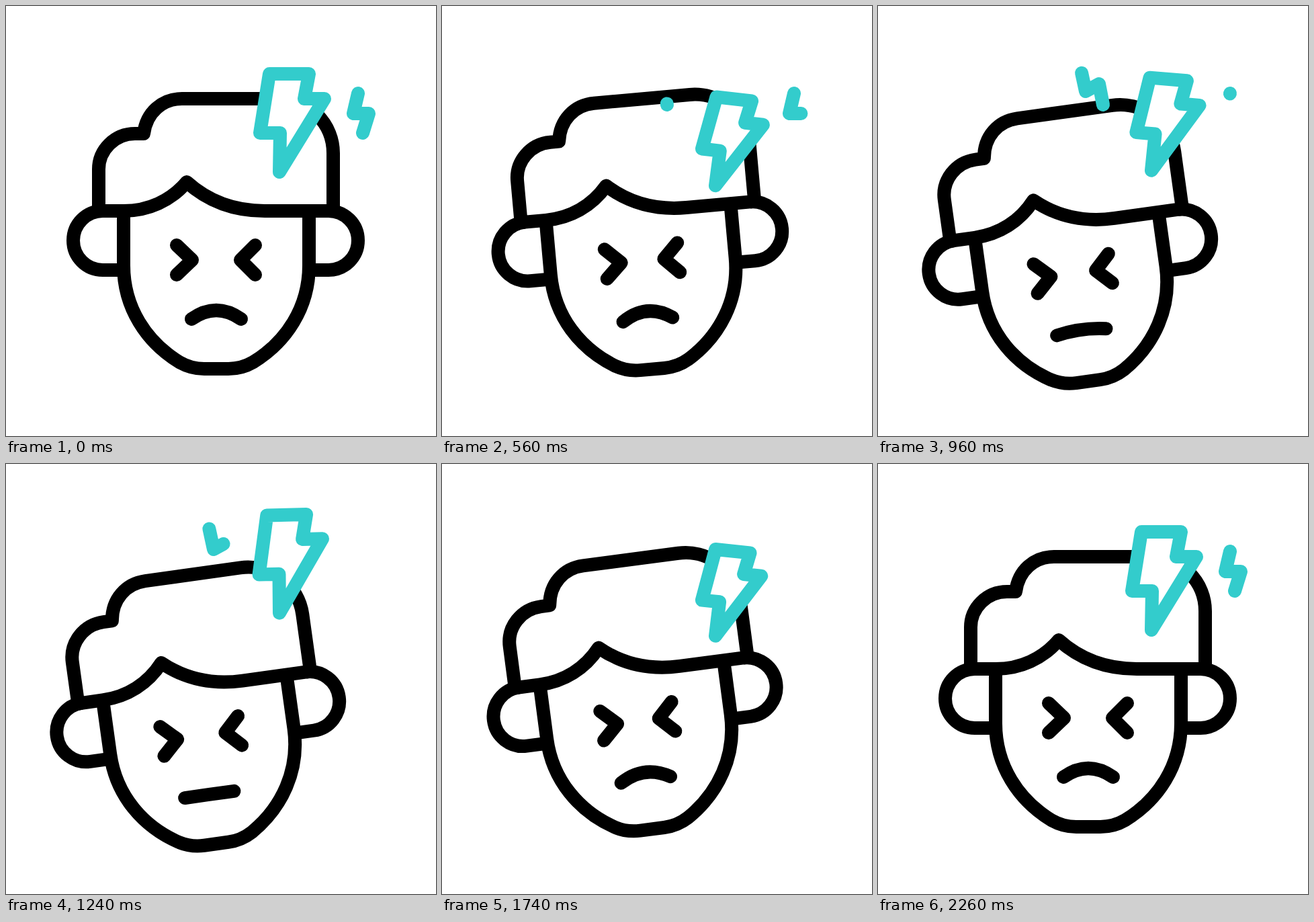
These frames come from a looping animation (640x640 px, 2400 ms). An HTML page:

```html
<!DOCTYPE html>
<html lang="en">
<head>
<meta charset="utf-8">
<title>Headache</title>
<style>
  html, body { margin: 0; width: 100%; height: 100%; overflow: hidden; background: #fff; }
  svg { display: block; width: 100%; height: 100%; }
  path { fill: none; stroke-width: 20; stroke-linecap: round; stroke-linejoin: round; }
  #head path { stroke: #000; }
  #head .face { stroke-linecap: butt; }
  .spark { stroke: #33cccc; }
  #bolt { stroke: #33cccc; fill: #fff; vector-effect: non-scaling-stroke; }
</style>
</head>
<body>
<svg viewBox="0 0 640 640">
  <g id="head">
    <path class="face" d="M175 305V386C175 449 209 500 258 530C270 537 282 540 295 540H331C344 540 356 537 368 530C417 500 451 449 451 386V305"/>
    <path class="face" d="M175 393H144A44 44 0 0 1 144 305M451 393H480A44 44 0 0 0 480 305"/>
    <path d="M138 305V243A54 53 0 0 1 192 190H205C209 158 233 138 262 138H405A82 81 0 0 1 487 219V305H385C340 305 300 290 269 262C245 290 212 305 175 305Z"/>
    <path id="eyeL" d="M254 356L277 378L254 400"/>
    <path id="eyeR" d="M371 356L349 378L371 400"/>
    <path id="mouth"/>
  </g>
  <path id="sparkL" class="spark" d="M302.4 96.5L309 127L329 116L335 147"/>
  <path id="sparkR" class="spark" d="M524 130L517 160H540L531 189"/>
  <path id="bolt" d="M0 0L1 -58H-29L-15 -146H44L37 -109H67Z"/>
</svg>
<script>
const LOOP = 2400;
const $ = id => document.getElementById(id);
const head = $('head'), eyeL = $('eyeL'), eyeR = $('eyeR'), mouth = $('mouth');
const bolt = $('bolt'), sparkL = $('sparkL'), sparkR = $('sparkR');

function ease(t, from, to) {
  const k = Math.min(1, Math.max(0, (t - from) / (to - from)));
  return k * k * (3 - 2 * k);
}

// Rises from 0 to 1 at the peak, then falls back to 0
const bump = (t, from, peak, to) => ease(t, from, peak) - ease(t, peak, to);

// Shows only the part of a path between fractions a and b
function trim(path, a, b) {
  const len = path.getTotalLength();
  path.style.display = b - a > 0.0005 ? '' : 'none';
  path.style.strokeDasharray = `${(b - a) * len} 999`;
  path.style.strokeDashoffset = -a * len;
}

function draw(t) {
  // Two throbs, with a jump between them
  const throb1 = bump(t, 200, 700, 1200);
  const throb2 = bump(t, 1200, 1700, 2200);
  const jump = bump(t, 700, 1200, 1700);
  const squeeze = throb1 + throb2;

  const nod = bump(t, 500, 1200, 1900);
  const tilt = -7.9 * (ease(t, 200, 800) - ease(t, 1680, 2130));
  head.setAttribute('transform', `translate(0 ${25.5 * nod}) rotate(${tilt} 313 540)`);
  eyeL.setAttribute('transform', `translate(${5 * squeeze} 0)`);
  eyeR.setAttribute('transform', `translate(${-5 * squeeze} 0)`);
  mouth.setAttribute('d', `M276 466Q313 ${440 + 26 * nod} 350 466`);

  const y = 247 + 25 * throb1 - 26 * jump + 9 * throb2;
  const turn = 8 * bump(t, 200, 700, 1500) - 4.6 * bump(t, 700, 1500, 1700)
    + 6 * bump(t, 1500, 1700, 2200);
  const size = 1 - 0.125 * squeeze;
  bolt.setAttribute('transform', `translate(407 ${y}) rotate(${turn}) scale(${size})`);
  bolt.style.strokeWidth = 20;

  trim(sparkL, 1 - ease(t, 520, 1020), 1 - ease(t, 1020, 1500));
  if (t < LOOP / 2) trim(sparkR, 0, 1 - ease(t, 200, 1000));
  else trim(sparkR, 1 - ease(t, 1760, 2260), 1);
}

const start = performance.now();
function tick() {
  draw((performance.now() - start) % LOOP);
  requestAnimationFrame(tick);
}
draw(0);
requestAnimationFrame(tick);
</script>
</body>
</html>
```
